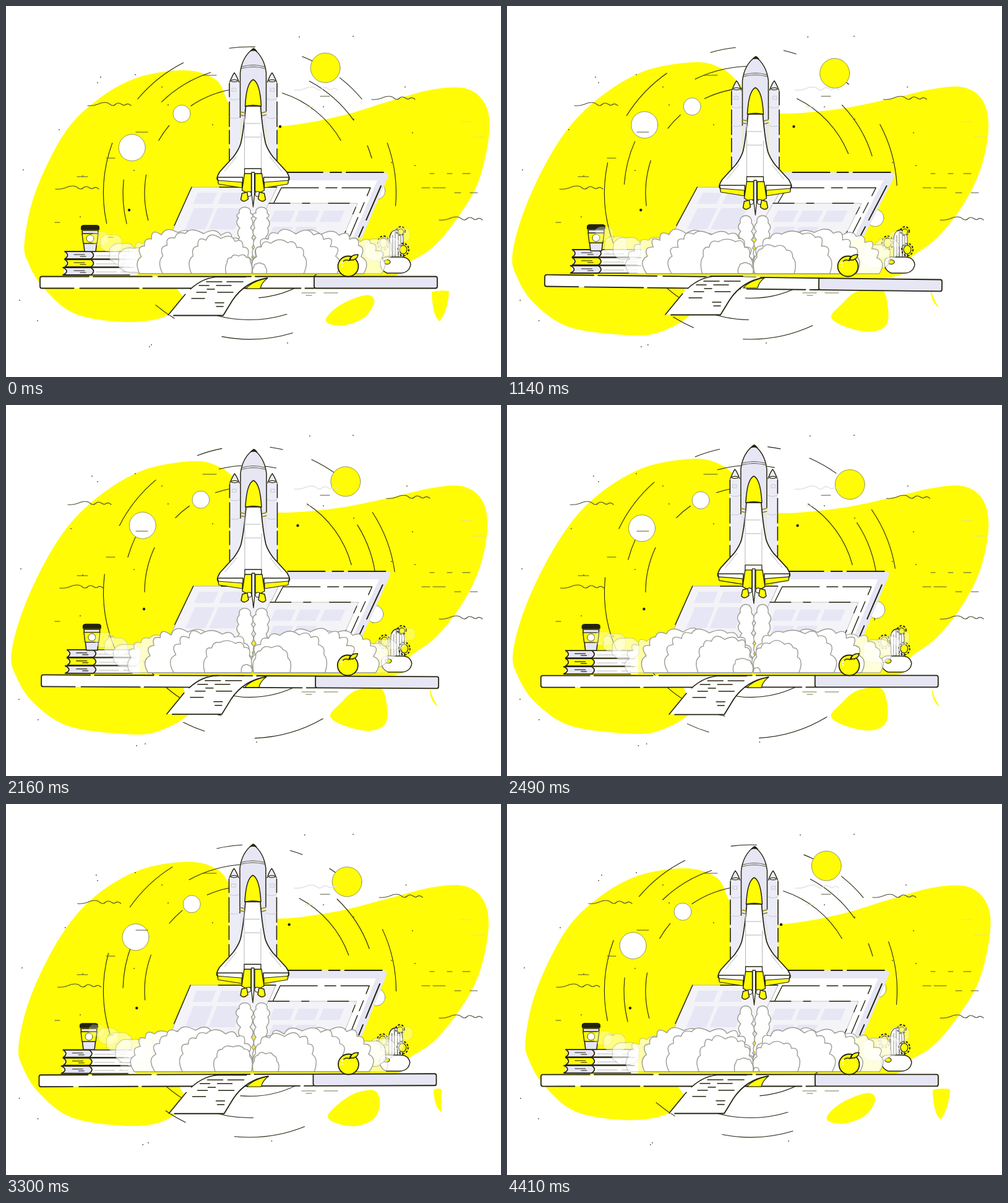
An HTML page with a canvas that plays this animation: 800 px wide and 600 px high, repeating every 4440 ms.

```html
<!DOCTYPE html>
<html lang="en">
<head>
<meta charset="utf-8">
<title>Shuttle launch</title>
<style>
html, body { margin: 0; width: 100%; height: 100%; overflow: hidden; background: #fff; }
canvas { display: block; }
</style>
</head>
<body>
<canvas id="stage" width="800" height="600"></canvas>
<script>
const c = document.getElementById('stage').getContext('2d');
const LOOP = 4440, STEP = 30;
const YELLOW = '#fffc05', INK = '#24230f', LILAC = '#e6e6f5', PALE = '#f3f3f8', SMOKE = '#9b9b92';
const TIMES = [0, 510, 1140, 2160, 2820, 3810];
const RAD = Math.PI / 180;
const mix = (a, b, k) => a + (b - a) * k;

// Smooth periodic curve through one value per entry of TIMES.
function track(...v) {
  const n = TIMES.length;
  const time = i => TIMES[(i + n) % n] + Math.floor(i / n) * LOOP;
  const val = i => v[(i + n) % n];
  const slope = i => {
    const a = (val(i) - val(i - 1)) / (time(i) - time(i - 1));
    const b = (val(i + 1) - val(i)) / (time(i + 1) - time(i));
    return a * b <= 0 ? 0 : 2 * a * b / (a + b);
  };
  return t => {
    let i = n - 1;
    while (TIMES[i] > t) i--;
    const h = time(i + 1) - time(i), u = (t - time(i)) / h, w = 1 - u;
    return val(i) * (1 + 2 * u) * w * w + slope(i) * h * u * w * w
      + val(i + 1) * u * u * (3 - 2 * u) - slope(i + 1) * h * u * u * w;
  };
}

const morph = track(0, .62, 1, 1, .86, .05);
const crest = track(0, -10, 0, 0, -9, 0);
const sway = track(0, .36, 1, .36, -.3, -.15);
const drift = track(0, .28, .72, 1, .8, .2);
const bob = track(0, 5, 13, 3, -9, 2);

function shape(d, fill, stroke, width = 1.5) {
  const p = new Path2D(d);
  if (fill) { c.fillStyle = fill; c.fill(p); }
  if (stroke) { c.strokeStyle = stroke; c.lineWidth = width; c.stroke(p); }
}
function disc(x, y, r, fill, stroke, width = 1, ry = r) {
  c.beginPath();
  c.ellipse(x, y, r, ry, 0, 0, 7);
  if (fill) { c.fillStyle = fill; c.fill(); }
  if (stroke) { c.strokeStyle = stroke; c.lineWidth = width; c.stroke(); }
}
function at(x, y, draw) {
  c.save();
  c.translate(x, y);
  draw();
  c.restore();
}
function dashed(pattern, draw) {
  c.setLineDash(pattern);
  draw();
  c.setLineDash([]);
}

// Closed Catmull-Rom curve between two flat point lists.
function smoothBlob(a, b, k, lift = () => 0) {
  const pts = [];
  for (let i = 0; i < a.length; i += 2) {
    pts.push([mix(a[i], b[i], k), mix(a[i + 1], b[i + 1], k) + lift(i / 2)]);
  }
  const n = pts.length, p = i => pts[(i + n) % n];
  c.beginPath();
  c.moveTo(...p(0));
  for (let i = 0; i < n; i++) {
    const [q, r, s, u] = [p(i - 1), p(i), p(i + 1), p(i + 2)];
    c.bezierCurveTo(r[0] + (s[0] - q[0]) / 6, r[1] + (s[1] - q[1]) / 6,
      s[0] - (u[0] - r[0]) / 6, s[1] - (u[1] - r[1]) / 6, s[0], s[1]);
  }
  c.fillStyle = YELLOW;
  c.fill();
}

const landA = [30,380, 48,300, 95,205, 150,150, 215,115, 290,104, 340,120, 362,160, 395,190,
  450,194, 540,178, 620,154, 690,135, 745,134, 775,160, 781,205, 765,280, 735,335, 690,390,
  640,420, 600,440, 300,440, 285,475, 255,503, 190,511, 110,497, 60,455, 36,415];
const landB = [9,400, 32,320, 80,225, 135,160, 215,108, 300,91, 345,100, 375,125, 405,165,
  450,174, 540,166, 620,150, 690,134, 740,132, 770,155, 778,200, 765,265, 735,325, 695,375,
  655,405, 610,440, 310,440, 300,495, 245,528, 190,532, 100,519, 45,482, 17,440];
const islandA = [517,506, 535,487, 565,472, 588,468, 595,480, 580,503, 550,516, 525,515];
const islandB = [524,503, 540,483, 565,462, 605,458, 616,490, 612,517, 585,527, 545,518];
const dropLeft = track(688, 690, 685, 685, 689, 692);
const dropRight = track(716, 694, 686, 686, 691, 715);
const dropTip = track(510, 493, 488, 488, 490, 508);

function background(t) {
  const k = morph(t), up = crest(t);
  smoothBlob(landA, landB, k, i => i > 2 && i < 8 ? up : 0);
  smoothBlob(islandA, islandB, k);
  const l = dropLeft(t), r = dropRight(t), y = dropTip(t);
  const tip = l + 13;
  shape(`M${l} 462Q${mix(l, r, .5)} 459 ${r} 461Q${mix(tip, r, .9)} ${y - 18} ${tip} ${y}Q${l + 1} ${y - 8} ${l} 462Z`, YELLOW);
}

const CX = 394, CY = 302.5;
const rings = [
  { r: 236.5, turn: track(0, -4, -8, -13, -15, 6),
    arcs: [[-140, -117], [-98, -88], [-69, -64], [-52, -40], [-20, 5], [73, 101], [121, 130], [168, 200]] },
  { r: 205, turn: track(0, 5, 18, 30, 26, 4),
    arcs: [[-134, -108], [-62, -35], [-22, -16], [73, 117], [166, 186]] },
  { r: 170, turn: track(0, 3, 8, 15, 15, 3),
    arcs: [[-150, -140], [-124, -100], [-72, -30], [50, 85], [165, 190]] }
];
const planets = [
  { r: 236.5, size: 24, fill: YELLOW, angle: track(-58.9, -58, -55, -49.1, -46.4, -52.4) },
  { r: 204, size: 21.5, fill: '#fff', angle: track(-158.9, -154.7, -147.3, -148.1, -151.8, -157.3) },
  { r: 169, size: 14, fill: '#fff', angle: track(-130.6, -128.7, -124.1, -117.9, -120, -127.9) },
  { r: 205, size: 14, fill: '#fff', angle: track(-1, 3.5, 11.3, 10, 5.5, .5) }
];
function orbits(t) {
  for (const { r, turn, arcs } of rings) {
    for (const [a, b] of arcs) {
      c.beginPath();
      c.arc(CX, CY, r, (a + turn(t)) * RAD, (b + turn(t)) * RAD);
      c.strokeStyle = INK;
      c.lineWidth = 1.1;
      c.stroke();
    }
  }
  for (const p of planets) {
    const a = p.angle(t) * RAD;
    disc(CX + p.r * Math.cos(a), CY + p.r * Math.sin(a), p.size, p.fill, '#55543a', .6);
  }
}

const stars = [[474, 50, 17], [561, 49, 0], [153, 115, -14], [148, 124, 0], [86, 200, 19], [28, 265, -4],
  [22, 476, -1], [51, 509, 1], [235, 548, -10], [232, 551, -21], [455, 545, -50], [645, 131, 3],
  [124, 275, 0], [252, 131, 0], [209, 111, 0], [262, 160, 0], [334, 192, 0], [207, 266, 0],
  [513, 163, 0], [562, 183, 0], [657, 205, 0], [623, 253, 0], [661, 258, 0], [120, 341, 0]];
const ticks = [[162, 246, 14], [115, 276, 17], [210, 204, 19], [79, 350, 8], [165, 374, 8], [318, 112, 22],
  [672, 294, 13], [690, 294, 20], [713, 271, 8], [738, 271, 12], [725, 302, 10], [750, 302, 12],
  [685, 271, 7], [508, 146, 15]];
const waves = [[132, 160, -32], [80, 295, 7], [591, 150, 24], [700, 345, 0]];
const wave = 'M0 1Q8 2 16 -1C24 -5 32 -5 36 -1Q41 3 45 -1Q49 -5 55 -1Q59 2 62 -1Q66 -3 70 1';
function sky(t) {
  const d = drift(t);
  for (const [x, y, dx] of stars) disc(x + dx * d, y, .9, '#55543a');
  disc(443 + 28.5 * d, 195, 2.2, INK);
  disc(199 + 24 * d, 330, 2.2, INK);
  for (const [x, y, w] of ticks) shape(`M${x} ${y}h${w}`, null, '#55543a', 1);
  for (const [x, y, dx] of waves) at(x + dx * d, y, () => shape(wave, null, '#4a4932', 1.1));
  at(466, 135, () => shape(wave, null, '#e2e2e8', 1.5));
  shape('M735 187h16M755 212h20M484 163h12', null, '#dddda0', 1.2);
}

const tile = (x, y, w, h) => shape(`M${x} ${y}h${w}l${-h * .42} ${h}h${-w}z`, LILAC);
function laptop(s) {
  c.save();
  // Lean the screen around its hinge.
  c.transform(1, 0, -.09 * s, 1, .09 * s * 375, 0);
  shape('M438 269H612Q620 269 617 277L575 376H395Z', LILAC);
  shape('M442 282H600L560 376H395Z', '#fff');
  dashed([60, 12, 18, 8], () => {
    shape('M452 269H612', null, INK, 2);
    shape('M445 294H589L556 372M445 294L432 320', null, INK, 1.4);
    shape('M606 291L570 374', null, INK, 2);
  });
  shape('M300 293H438L400 376H264Z', PALE, '#b6b6b2', 1);
  shape('M345 293H438M300 293L272 355', null, INK, 1.4);
  tile(310, 302, 31, 18);
  tile(350, 302, 36, 18);
  tile(304, 327, 32, 34);
  tile(342, 327, 42, 34);
  shape('M425 319H568L544 376H398Z', PALE, '#c4c4c0', 1);
  dashed([34, 20, 12, 30], () => shape('M425 319H568L546 371', null, INK, 1.3));
  for (let i = 0; i < 3; i++) {
    tile(434 + 40 * i, 331, 33, 18);
    if (i < 2) tile(432 + 38 * i, 357, 32, 18);
  }
  c.restore();
}

function cupAndBooks(s) {
  at(10.5 * s, -3 * s, () => {
    ['#e6e6f5', YELLOW, '#e6e6f5'].forEach((fill, i) => {
      const y = 397 + 13 * i, x = i === 2 ? -3 : 0;
      shape(`M${97 + x} ${y}H212V${y + 12}H${97 + x}Z`, '#fff');
      shape(`M${95 + x} ${y}H137Q146 ${y + 6} 137 ${y + 12}H${95 + x}Q104 ${y + 6} ${95 + x} ${y}Z`, fill, INK, 1.8);
      shape(`M137 ${y}H206M137 ${y + 12}H200`, null, INK, 1.4);
      shape(`M146 ${y + 7}H178M186 ${y + 7}h14`, null, '#aaa', .8);
      shape(`M110 ${y + 5}h17M120 ${y + 8}h9`, null, INK, 1.1);
    });
  });
  at(136 + 8 * s, -s, () => {
    shape('M-13 363H13L9 397H-9Z', LILAC, INK, 1.6);
    shape('M-13 368H13L11 384H-11Z', YELLOW, INK, 1.3);
    disc(0, 376, 6, '#fff', INK, .8);
    shape('M-15 362V357Q-14 354 -10 354H10Q14 354 15 357V362Z', INK);
  });
}

function cactus(s) {
  at(630 + 5 * s, 0, () => {
    shape('M-10 408V376Q-9 363 1 362Q11 363 12 376V408Z', '#fff', INK, 1.3);
    shape('M-5 405V371M-1 405V364M4 405V365M8 405V371', null, INK, 1);
    disc(-20, 383, 6, YELLOW, INK, 1.2, 8);
    disc(12, 394, 6, YELLOW, INK, 1.2, 7);
    disc(8, 365, 4.5, YELLOW, INK, 1.1);
    dashed([2, 4], () => {
      disc(-20, 383, 9, null, INK, 2, 11);
      disc(8, 364, 7, null, INK, 2);
      disc(12, 394, 9, null, INK, 2, 10);
    });
    shape('M-24 410Q-18 404 -8 406H8Q22 406 24 418Q22 431 8 432H-14Q-28 426 -24 410Z', '#fff', INK, 1.5);
    disc(-14, 414, 5, YELLOW, INK, 1.2, 3.5);
  });
}

const noise = n => { const x = Math.sin(n * 12.9898) * 43758.5453; return x - Math.floor(x); };

// Puffy outline on a rounded box; angles in half turns.
function puff(x, y, rx, ry, from, to, bumps, seed, alpha) {
  const power = .72;
  const point = (a, k) => {
    const cs = Math.cos(a * Math.PI), sn = Math.sin(a * Math.PI);
    return [x + rx * k * Math.sign(cs) * Math.abs(cs) ** power, y + ry * k * Math.sign(sn) * Math.abs(sn) ** power];
  };
  c.save();
  c.globalAlpha = alpha;
  c.beginPath();
  c.moveTo(...point(from, .93));
  for (let i = 0; i < bumps; i++) {
    const a = mix(from, to, (i + .5) / bumps), b = mix(from, to, (i + 1) / bumps);
    c.quadraticCurveTo(...point(a, 1.06 + .1 * noise(seed + i)), ...point(b, .9 + .07 * noise(seed * 3 + i)));
  }
  c.closePath();
  c.fillStyle = '#fff';
  c.fill();
  c.globalAlpha = alpha * alpha;
  c.strokeStyle = SMOKE;
  c.lineWidth = 1.4;
  c.stroke();
  c.restore();
}

const BEAT = 148, BEATS = LOOP / BEAT, LIFE = 5 * BEAT;
function clouds(t, side) {
  const clock = t + (side < 0 ? 100 : 50), newest = Math.floor(clock / BEAT);
  for (let k = 6; k >= 0; k--) {
    const id = (newest - k + BEATS) % BEATS, seed = id * 7 + side + 3;
    const u = (clock - (newest - k) * BEAT) / LIFE;
    if (u > .72) {
      const v = (u - .72) / .68;
      if (v < 1) {
        puff(398 + side * mix(190, 252, v), mix(414, 372, v) - 12 * noise(seed), mix(26, 13, v), mix(21, 10, v),
          0, 2, 8, seed, .75 * (1 - v * .65));
      }
    }
    if (u >= 1) continue;
    const reach = (side < 0 ? 212 : 222) * (1 - (1 - u) ** 1.6);
    const inner = Math.max(0, u - .5) * 230;
    const high = 70 * Math.sin(Math.min(1, reach / 150) * Math.PI / 2) - Math.max(0, u - .75) * 90;
    puff(398 + side * (reach + inner) / 2, 433, (reach - inner) / 2, high, 1, 2,
      Math.round(4 + Math.min(u, .5) * 12), seed, u > .78 ? 1 - (u - .78) * 3 : 1);
  }
}

function exhaust(t, top) {
  const shift = t / BEAT % 1, first = Math.floor(t / BEAT);
  for (const x of [386, 413]) {
    const lean = x < 400 ? 1 : -1;
    const edge = [];
    for (let i = 0; i < 7; i++) {
      const k = Math.min(1, Math.max(0, (i + shift - .5) / 6));
      const w = mix(11.5, 8, k) + 3 * noise((first - i + BEATS) % BEATS + x);
      edge.push([x + lean * 8 * k * k, mix(top + 10, 430, k), w]);
    }
    c.beginPath();
    c.moveTo(edge[0][0] - 9, edge[0][1]);
    c.bezierCurveTo(x - 12, top - 3, x + 12, top - 3, edge[0][0] + 9, edge[0][1]);
    const run = (list, dir) => {
      for (let i = 1; i < list.length; i++) {
        const [a, b] = [list[i - 1], list[i]];
        c.quadraticCurveTo(b[0] + dir * (b[2] + 4), (a[1] + b[1]) / 2, b[0] + dir * (b[2] - 3), b[1]);
      }
    };
    run(edge, 1);
    run(edge.slice().reverse(), -1);
    c.closePath();
    c.fillStyle = '#fff';
    c.fill();
    c.strokeStyle = SMOKE;
    c.lineWidth = 1.4;
    c.stroke();
  }
}

function mirrored(draw) {
  draw();
  c.save();
  c.scale(-1, 1);
  draw();
  c.restore();
}
function shuttle(dy) {
  at(399.5 + dy * .15, dy, () => {
    mirrored(() => {
      shape('M-39 262V124L-37 122Q-33 110 -30.500 108Q-26 112 -23 122L-21 125V262Z', '#ececf6');
      shape('M-38 123Q-33 111 -30.500 108Q-27 112 -23 123', null, INK, 1.4);
      disc(-30.5, 121, 5, '#fff', INK, 1.2, 1.6);
      dashed([22, 8, 40, 6], () => shape('M-38.500 125V250', null, INK, 1.6));
      shape('M-38 150Q-30 154 -22 150M-38 180Q-30 184 -22 180M-34 133h6v5h-6z', null, '#c7c7d6', 1);
    });
    shape('M0 69Q-18 82 -21 108V255H21V108Q18 82 0 69Z', LILAC);
    shape('M0 69Q-18 82 -21 108V180M0 69Q18 82 21 108V170', null, INK, 1.5);
    shape('M-6 74Q-2 69 1 68Q4 69 7 74Q0 71 -6 74Z', INK);
    shape('M-18 98Q0 93 18 98M-19 101Q0 96 19 101', null, '#55543a', 1.1);
    shape('M-21 171l8 2M-21 176l8 2M21 171l-8 2M21 176l-8 2', null, '#8a8300', 1.5);
    shape('M-12 162Q-15 200 -20 222Q-23 232 -32 244L-54 268Q-60 278 -58 281L0 290L58 281Q60 278 54 268L32 244Q23 232 20 222Q15 200 12 162Z', '#fff', INK, 1.7);
    shape('M-13 162Q-11 124 0 119Q11 124 13 162Q0 159 -13 162Z', YELLOW, INK, 1.5);
    shape('M-14 168V262M13 205V262M-46 267L-27 244M46 267L27 244M-13 190h24M-13 212h24', null, '#b5b5ba', 1);
    mirrored(() => {
      shape('M-58 277H-17V293L-56 286Z', '#fff', INK, 1.5);
      shape('M-57 282L-18 285V294L-56 288Z', YELLOW, INK, 1.2);
      shape('M-14 271Q-8 268 -3 271V300L-9 303L-18 298Z', YELLOW, INK, 1.4);
      disc(-7, 304, 4, '#fff', INK, 1.2);
      shape('M-18 303L-10 301L-8 312Q-15 319 -20 313Z', YELLOW, INK, 1.4);
    });
    shape('M-14 263H13V271H-14Z', '#fff', INK, 1.3);
    shape('M-2.500 269H2V304L0 325L-2.500 304Z', '#fff', INK, 1.3);
  });
}

function desk(s) {
  c.save();
  c.translate(376 + 6 * s, 447.5 + s);
  c.rotate(.0125 * s);
  shape('M-318 -10H122V9H-318Q-321 9 -321 6V-7Q-321 -10 -318 -10Z', '#fff');
  shape('M122 -10H318Q321 -10 321 -7V6Q321 9 318 9H125Q122 9 122 6Z', LILAC, INK, 1.8);
  dashed([95, 7, 150, 10], () => shape('M122 -10H-318Q-321 -10 -321 -7V6Q-321 9 -318 9H122', null, INK, 1.8));
  c.restore();
}
function paper(s) {
  at(-6 * s, -s, () => {
    shape('M423 440Q398 445 388 457H411Q413 447 423 440Z', YELLOW, INK, 1.2);
    shape('M330 438Q303 449 285 472L262 500L350 501L365 478Q385 446 422 440Z', '#fff');
    dashed([52, 12], () => shape('M345 438Q312 438 285 472L262 500', null, INK, 1.6));
    shape('M271 500.500H351L366 476Q386 446 422 440M335 438h52', null, INK, 1.8);
    shape('M324 446h25M357 446h26M312 452h16M340 452h24M325 458h12M342 463h25M308 463h16M300 473h21M338 480h14M340 486h11', null, INK, 1.5);
  });
  shape('M478 464h22M514 464h22M485 468h9', null, '#77764a', 1.2);
}
function apple(s) {
  at(553 - 2 * s, 420, () => {
    disc(0, 1, 16.5, YELLOW, INK, 1.8);
    shape('M-8 -7Q-3 -11 1 -8Q5 -11 9 -9M1 -8Q3 -13 5 -15', null, INK, 1.4);
    shape('M3 -9Q4 -18 16 -18Q15 -9 3 -9Z', YELLOW, INK, 1.5);
    shape('M-11 -4l2 -2M-10 0v1', null, '#fff', 2);
  });
}

function frame(now) {
  const t = Math.floor(now % LOOP / STEP) * STEP, s = sway(t), dy = bob(t);
  c.fillStyle = '#fff';
  c.fillRect(0, 0, 800, 600);
  c.lineCap = c.lineJoin = 'round';
  background(t);
  orbits(t);
  sky(t);
  laptop(s);
  cupAndBooks(s);
  cactus(s);
  exhaust(t, 325 + dy);
  clouds(t, -1);
  clouds(t, 1);
  shuttle(dy);
  desk(s);
  paper(s);
  apple(s);
  requestAnimationFrame(() => frame(performance.now() - start));
}
const start = performance.now();
frame(0);
</script>
</body>
</html>
```
